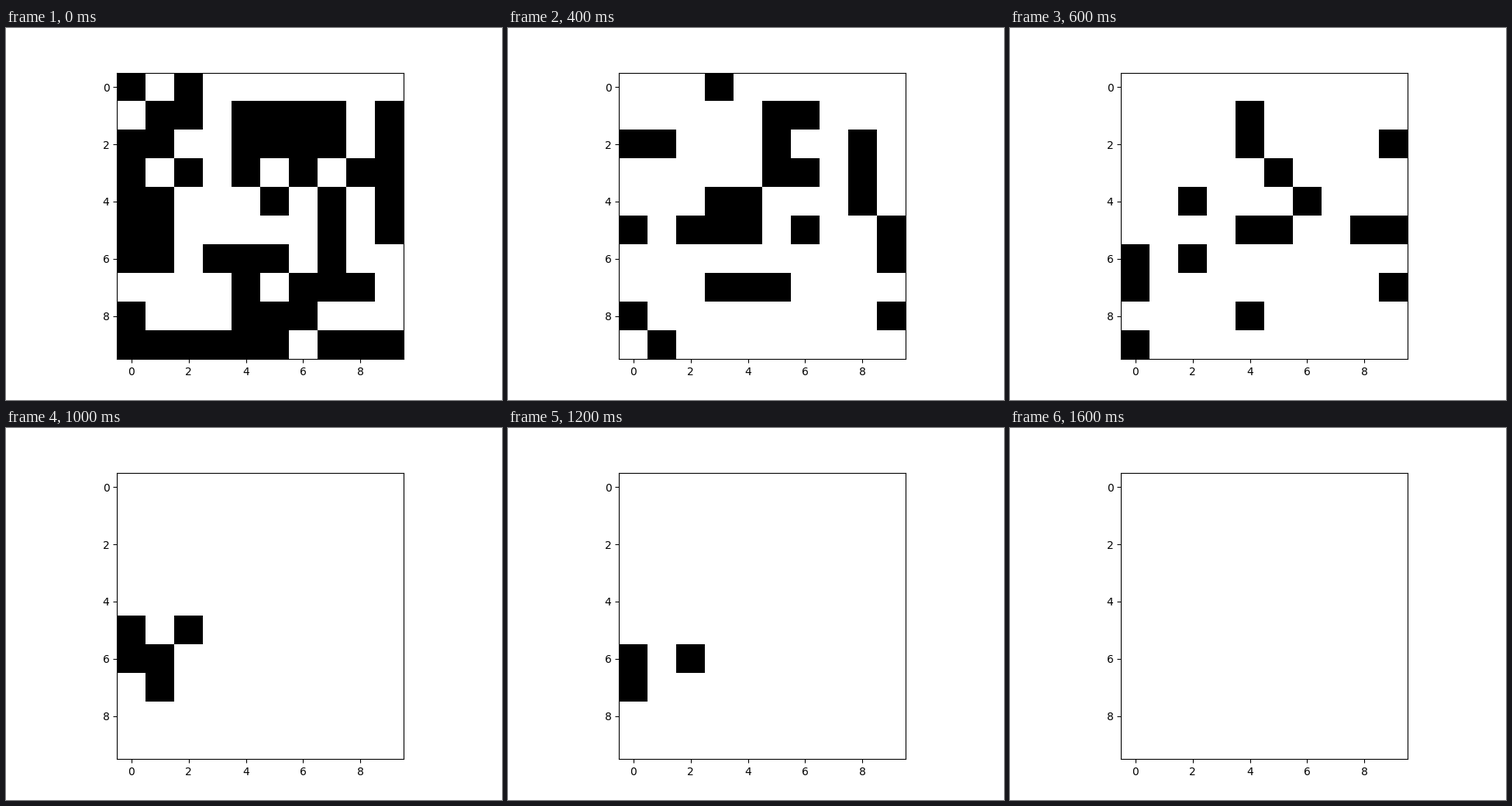
Animation of 640x480 px, one loop 8 s. Source, as a matplotlib script:

```python
import numpy as np
import matplotlib.pyplot as plt
from matplotlib.animation import FuncAnimation

STEP_MS = 200
LOOP_MS = 8000
FRAMES = LOOP_MS // STEP_MS

START = """
#.#.......
.##.####.#
##..####.#
#.#.#.#.##
##...#.#.#
##.....#.#
##.###.#..
....#.###.
#...###...
######.###
"""


def parse(text):
    return np.array([[c == "#" for c in row] for row in text.split()], dtype=int)


def evolve(grid):
    """One generation on a torus: 3 neighbours give life, 6 or more keep the state."""
    shifts = [(dy, dx) for dy in (-1, 0, 1) for dx in (-1, 0, 1) if dy or dx]
    near = sum(np.roll(grid, s, axis=(0, 1)) for s in shifts)
    return np.where(near == 3, 1, np.where(near >= 6, grid, 0))


states = [parse(START)]
while len(states) < FRAMES:
    states.append(evolve(states[-1]))

fig, ax = plt.subplots(figsize=(6.4, 4.8), dpi=100)
image = ax.imshow(states[0], cmap="binary", vmin=0, vmax=1, interpolation="nearest")


def update(i):
    image.set_data(states[i])
    return [image]


anim = FuncAnimation(fig, update, frames=FRAMES, interval=STEP_MS, repeat=True, repeat_delay=0)
plt.show()
```
